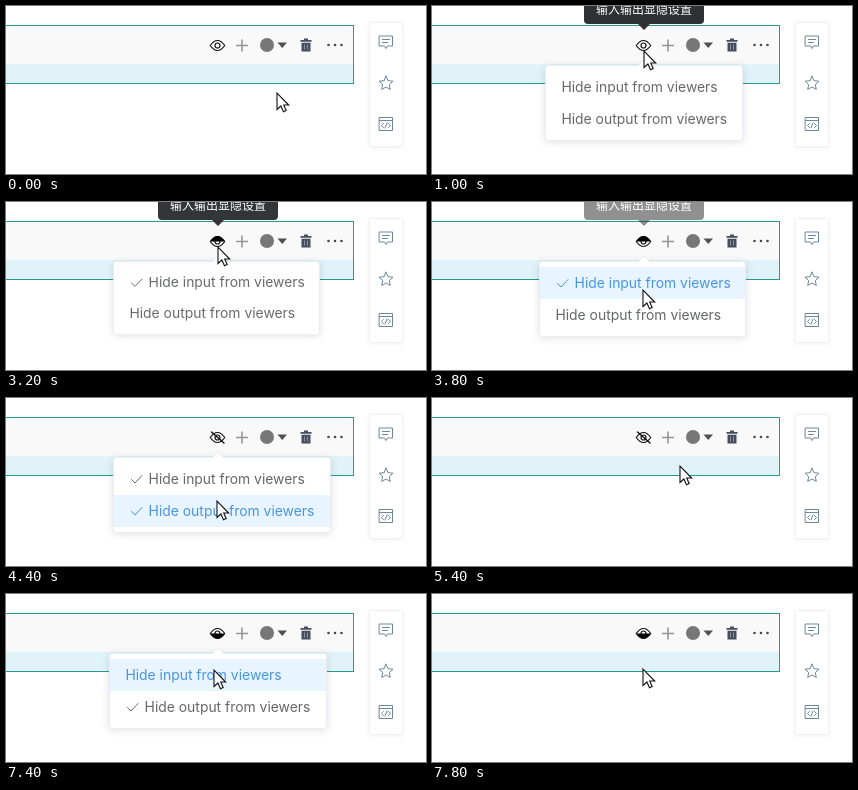
These frames come from a looping animation (420 by 168 pixels, 8 s). An HTML page:

```html
<!DOCTYPE html>
<html lang="en">
<head>
<meta charset="utf-8">
<title>Cell visibility menu</title>
<style>
  html, body { margin: 0; width: 100%; height: 100%; overflow: hidden; background: #fff; }
  svg { display: block; width: 420px; height: 168px; }
  .line { fill: none; stroke: currentColor; stroke-linecap: round; stroke-linejoin: round; }
  .panel { fill: #fff; stroke: #e9ecf1; filter: drop-shadow(0 1px 4px rgba(0, 0, 0, .12)); }
  .side { stroke: #eff0f2; filter: drop-shadow(0 1px 2px rgba(0, 0, 0, .06)); }
  .row { color: #666769; font: 13.9px Inter, sans-serif; }
  .row rect { fill: none; }
  .row text { fill: currentColor; }
  .row.hover { color: #4796e3; }
  .row.hover rect { fill: #e8f4ff; }
  .tip { font: 500 12px "Noto Sans CJK SC", "Noto Sans CJK", sans-serif; }
</style>
</head>
<body>
<svg viewBox="0 0 420 168">
  <!-- notebook cell -->
  <rect y="19" width="348" height="59" fill="#269b8c"/>
  <rect y="20" width="347" height="38" fill="#f9f9f9"/>
  <rect y="58" width="347" height="19" fill="#e0f3f8"/>

  <!-- toolbar -->
  <g transform="translate(211.5 39.5)" color="#111">
    <path class="line" d="M-7.3 0Q0-10 7.3 0Q0 10-7.3 0Z" stroke-width="1.1"/>
    <circle class="line" r="2.5" stroke-width="1.2"/>
    <path data-eye="input" d="M-7.3 0Q0-11 7.3 0Z"/>
    <path data-eye="output" d="M-7.3 0Q0 10 7.3 0Z"/>
    <path data-eye="both" class="line" d="M-6-5.5L6.5 5.5" stroke-width="1.4"/>
  </g>
  <path d="M230 39.5h12M236 33.5v12" stroke="#979797" stroke-width="1.6"/>
  <circle cx="261" cy="39" r="7" fill="#777"/>
  <path d="M271.5 36.5h9.5l-4.75 5.5z" fill="#505050"/>
  <path d="M294.5 34h3.5v-1.5h4v1.5h3.5v1.7h-11zM295.5 36.7h9v8.8h-9z" fill="#454d5f"/>
  <path d="M298.5 38.5v5M301.5 38.5v5" stroke="#a4a9b3" stroke-width=".8"/>
  <path class="line" d="M322.5 39h0m6.500 0h0m6.500 0h0" color="#484848" stroke-width="2.6"/>

  <!-- sidebar -->
  <rect class="panel side" x="363.5" y="16.5" width="33" height="124" rx="2"/>
  <g class="line" color="#6c8799">
    <path d="M373.5 30h13v10h-5l-1.5 2.5-1.5-2.5h-5zM376.5 33.5h7M376.5 36.5h5"/>
    <path id="star"/>
    <path d="M373.5 111.5h13v13h-13zM373.5 114.5h13M377.5 117.5l-2 2 2 2M382.5 117.5l2 2-2 2M381 117l-2 5"/>
  </g>

  <g id="menu">
    <rect id="box" class="panel" y=".5" height="75" rx="3"/>
    <path d="M206 1l6-6 6 6" fill="#fff" stroke="#e9ecf1"/>
    <g class="row"><rect y="6" height="32"/><path class="line"/><text y="26.5">Hide input from viewers</text></g>
    <g class="row"><rect y="38" height="32"/><path class="line"/><text y="58.5">Hide output from viewers</text></g>
  </g>

  <g id="tip" class="tip">
    <path d="M152-10h120v24a4 4 0 0 1-4 4h-50l-6 6-6-6h-50a4 4 0 0 1-4-4z" fill="#303133"/>
    <text x="164" y="7.5" fill="#fff">输入输出显隐设置</text>
  </g>

  <path id="cursor" d="M0 0V16.500L3.900 13l2.600 5.700 2.700-1.200-2.500-5.500h5z" fill="#fff" stroke="#111" stroke-width="1.1"/>
</svg>
<script>
// The screen refreshes every STEP ms; everything below is a function of that time.
const LOOP = 8000, STEP = 200;
const MENU_TOP = 59, ROW_HEIGHT = 32;
const OPEN_MS = 400, CLOSE_MS = 200, TIP_HOLD = 800, TIP_FADE = 300, CLICK_LEAD = 300;

// Each visit opens the menu, toggles one item and closes it again.
const visits = [
  { open: 600, close: 2100, item: 0, left: 113 },
  { open: 2860, close: 4400, item: 1, left: 107 },
  { open: 5500, close: 7600, item: 0, left: 103 }
];

const home = { x: 271, y: 87 };
const moves = [
  { from: 0, to: 700, x: 212, y: 45 },
  { from: 1000, to: 1600, x: 215, y: 80 },
  { from: 1900, to: 2200, x: 217, y: 71 },
  { from: 2400, to: 2900, x: 212, y: 45 },
  { from: 3400, to: 4000, x: 211, y: 103 },
  { from: 4400, to: 4600, x: 334, y: 116 },
  { from: 4900, to: 5700, x: 208, y: 46 },
  { from: 6000, to: 6800, x: 208, y: 76 },
  { from: 7400, to: 7800, x: 211, y: 75 }
];

const $ = id => document.getElementById(id);
const rows = [...document.querySelectorAll('.row')];
const marks = [...document.querySelectorAll('[data-eye]')];

const ramp = (t, start, length) => Math.min(1, Math.max(0, (t - start) / length));
const easeInOut = u => u * u * (3 - 2 * u);
const easeOut = u => 1 - (1 - u) ** 2;

function cursorAt(t) {
  return moves.reduce((p, m) => {
    const k = easeInOut(ramp(t, m.from, m.to - m.from));
    return { x: p.x + (m.x - p.x) * k, y: p.y + (m.y - p.y) * k };
  }, home);
}

function hiddenAt(t) {
  const hidden = [false, false];
  for (const v of visits) {
    if (t >= v.close - CLICK_LEAD) hidden[v.item] = !hidden[v.item];
  }
  return hidden;
}

function starPath(cx, cy, outer, inner) {
  const points = Array.from({ length: 10 }, (_, i) => {
    const r = i % 2 ? inner : outer, a = (i / 5 - .5) * Math.PI;
    return `${cx + r * Math.cos(a)} ${cy + r * Math.sin(a)}`;
  });
  return `M${points.join('L')}Z`;
}

function draw(now) {
  const t = Math.floor(now % LOOP / STEP) * STEP;
  const visit = visits.findLast(v => t >= v.open) || visits[0];
  const shown = easeOut(ramp(t, visit.open, OPEN_MS));
  const open = shown * (1 - ramp(t, visit.close, CLOSE_MS)) ** 2;
  const tip = shown * (1 - ramp(t, visit.open + TIP_HOLD, TIP_FADE));
  const cursor = cursorAt(t);
  const [input, output] = hiddenAt(t);
  const eye = input && output ? 'both' : input ? 'input' : output ? 'output' : 'none';
  const width = output ? 218 : input ? 207 : 198;
  const hover = open === 1 ? Math.floor((cursor.y - MENU_TOP - 6) / ROW_HEIGHT) : -1;

  marks.forEach(m => m.setAttribute('visibility', m.dataset.eye === eye ? 'visible' : 'hidden'));
  $('menu').setAttribute('transform', `translate(0 ${MENU_TOP}) scale(1 ${open || .01})`);
  $('menu').setAttribute('opacity', open);
  $('box').setAttribute('x', visit.left + .5);
  $('box').setAttribute('width', width - 1);

  rows.forEach((row, i) => {
    const [band, check, label] = row.children;
    const checked = [input, output][i];
    row.classList.toggle('hover', hover === i);
    band.setAttribute('x', visit.left + 1);
    band.setAttribute('width', width - 2);
    check.setAttribute('d', checked ? `M${visit.left + 18.5} ${22.5 + ROW_HEIGHT * i}l3.5 3.5 7-7.5` : '');
    label.setAttribute('x', visit.left + (checked ? 35.6 : 16.4));
  });

  $('tip').setAttribute('opacity', tip);
  $('cursor').setAttribute('transform', `translate(${Math.round(cursor.x)} ${Math.round(cursor.y)})`);
}

$('star').setAttribute('d', starPath(380, 77.5, 7.3, 3.5));
const start = performance.now();
function tick() {
  draw(performance.now() - start);
  requestAnimationFrame(tick);
}
tick();
</script>
</body>
</html>
```
